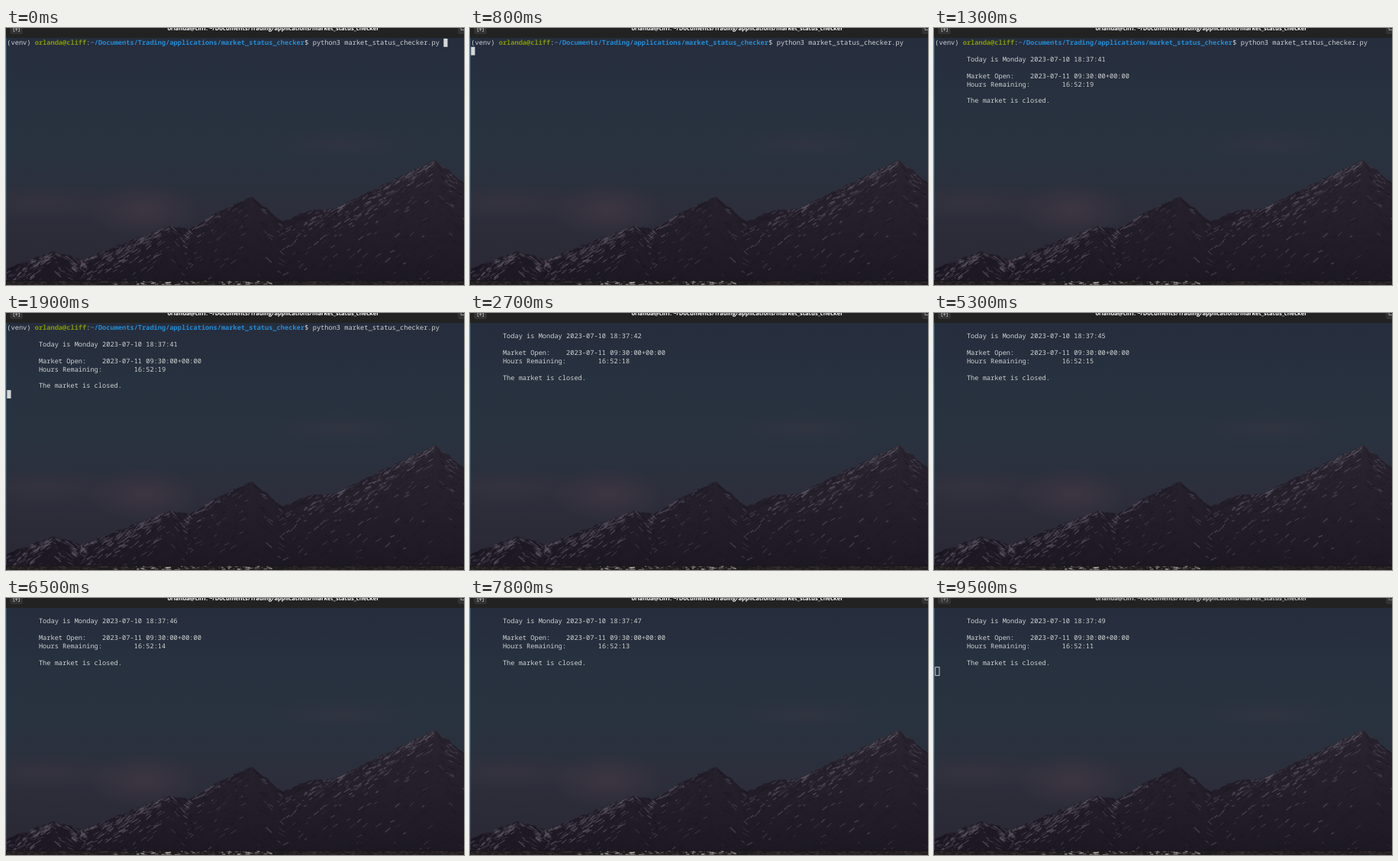
These frames come from a looping animation (600 by 337 pixels, 9600 ms). An HTML page with a canvas:

```html
<!DOCTYPE html>
<html lang="en">
<head>
<meta charset="utf-8">
<title>Market status checker</title>
<style>
  html, body { margin: 0; width: 100%; height: 100%; overflow: hidden; background: #222; }
  canvas, svg { position: absolute; left: 0; top: 0; width: 600px; height: 337px; }
  text { white-space: pre; text-rendering: geometricPrecision; }
  #screen text { font: 8.667px "Noto Sans Mono", "DejaVu Sans Mono", monospace; fill: #d0d2d2; }
  #screen .user { font-weight: 700; fill: #859900; }
  #screen .path { font-weight: 700; fill: #268bd2; }
  #title { font: 700 7.6px "Open Sans", "Noto Sans", sans-serif; fill: #fff; }
  .blurred #title { fill: #c4c4c4; }
  .blurred .icon { opacity: .6; }
</style>
</head>
<body>
<canvas id="wallpaper" width="600" height="337"></canvas>
<svg id="window" viewBox="0 0 600 337">
  <rect width="600" height="13" fill="#222"/>
  <rect x="5" y="-8" width="17" height="16" rx="3" fill="#333"/>
  <path class="icon" d="M11.5 0H10V4.5H11.5M16 0H17.5V4.5H16M12 1.5H15.5M13.7 0V4" fill="none" stroke="#bbb" stroke-width=".8"/>
  <rect x="592" y="-8" width="17" height="16" rx="3" fill="#333"/>
  <path class="icon" d="M596 0V2.5H600" fill="none" stroke="#bbb" stroke-width=".8"/>
  <text id="title" x="350" y="3.2" text-anchor="middle">orlanda@cliff: ~/Documents/Trading/applications/market_status_checker</text>
  <g id="screen"></g>
  <rect id="cursor" width="5.2" height="10.9"/>
</svg>
<script>
const LOOP = 9600, ENTER = 650, FIRST_OUTPUT = 1100, BLUR = 9400, BLINK = 600;
const CELL_W = 5.2, CELL_H = 10.9, LEFT = 1.3, TOP = 13.9;
const byId = id => document.getElementById(id);
const screenLayer = byId('screen'), cursor = byId('cursor'), frame = byId('window');

function addGroup() {
  const group = document.createElementNS('http://www.w3.org/2000/svg', 'g');
  return screenLayer.appendChild(group);
}

function write(group, row, col, content, className = '') {
  const node = document.createElementNS('http://www.w3.org/2000/svg', 'text');
  node.setAttribute('x', LEFT + col * CELL_W);
  node.setAttribute('y', TOP + row * CELL_H + 8.3);
  node.setAttribute('class', className);
  node.textContent = content;
  return group.appendChild(node);
}

const prompt = addGroup();
let column = 0;
for (const [content, style] of [
  ['(venv) '], ['orlanda@cliff', 'user'], [':'],
  ['~/Documents/Trading/applications/market_status_checker', 'path'],
  ['$ '], ['python3 '], ['market_status_checker.py ']
]) {
  write(prompt, 0, column, content, style);
  column += content.length;
}

const report = addGroup();
write(report, 1, 8, 'Today is Monday');
const today = write(report, 1, 24, '');
write(report, 3, 8, 'Market Open:');
write(report, 3, 24, '2023-07-11 09:30:00+00:00');
write(report, 4, 8, 'Hours Remaining:');
const remaining = write(report, 4, 32, '');
write(report, 6, 8, 'The market is closed.');

function placeCursor(row, col, hollow, visible) {
  const inset = hollow ? .5 : 0;
  cursor.setAttribute('x', LEFT + col * CELL_W + inset);
  cursor.setAttribute('y', TOP + row * CELL_H + inset);
  cursor.setAttribute('fill', hollow ? 'none' : '#d6d8d8');
  cursor.setAttribute('stroke', hollow ? '#c8caca' : 'none');
  cursor.setAttribute('visibility', visible ? 'visible' : 'hidden');
}

function render(now) {
  const t = now % LOOP;
  const tick = Math.floor((t - FIRST_OUTPUT) / 1000);
  const blurred = t >= BLUR;
  const lit = t < ENTER || (t - ENTER) % (2 * BLINK) < BLINK;

  frame.classList.toggle('blurred', blurred);
  prompt.style.display = tick < 1 ? '' : 'none';
  report.style.display = tick < 0 ? 'none' : '';
  report.setAttribute('transform', `translate(0 ${tick === 0 ? CELL_H : 0})`);
  today.textContent = `2023-07-10 18:37:${41 + tick}`;
  remaining.textContent = `16:52:${19 - tick}`;

  if (t < ENTER) placeCursor(0, column, false, true);
  else placeCursor(tick < 0 ? 1 : tick === 0 ? 8 : 7, 0, blurred, blurred || lit);
  requestAnimationFrame(render);
}

const ctx = byId('wallpaper').getContext('2d');
let seed = 17;
const random = () => (seed = seed * 16807 % 2147483647) / 2147483647;
const between = (a, b) => a + (b - a) * random();

function gradient(y0, y1, ...colors) {
  const fill = ctx.createLinearGradient(0, y0, 0, y1);
  colors.forEach((color, i) => fill.addColorStop(i / (colors.length - 1), color));
  return fill;
}

function cloud(x, y, rx, ry, alpha) {
  ctx.save();
  ctx.translate(x, y);
  ctx.scale(rx, ry);
  const glow = ctx.createRadialGradient(0, 0, 0, 0, 0, 1);
  glow.addColorStop(0, `rgba(72,58,70,${alpha})`);
  glow.addColorStop(1, 'rgba(72,58,70,0)');
  ctx.fillStyle = glow;
  ctx.fillRect(-1, -1, 2, 2);
  ctx.restore();
}

// Summits and saddles; snow is the cover of the slope leading up to each.
const summits = [
  { x: 0, y: 316, snow: 0 }, { x: 62, y: 293, snow: .5 },
  { x: 100, y: 304, snow: .3 }, { x: 215, y: 259, snow: .6 },
  { x: 240, y: 264, snow: .4 }, { x: 276, y: 242, snow: .5 },
  { x: 322, y: 221, snow: .15 }, { x: 362, y: 254, snow: .1 },
  { x: 398, y: 239, snow: .2 }, { x: 430, y: 237, snow: .5 },
  { x: 562, y: 173, snow: 1 }, { x: 600, y: 203, snow: .25 }
];

function slopeAt(x) {
  const i = Math.max(1, summits.findIndex(s => s.x >= x));
  const from = summits[i - 1], to = summits[i];
  const k = (x - from.x) / (to.x - from.x);
  const jag = Math.sin(x * .29) + .8 * Math.sin(x * .71 + 1);
  return {
    y: from.y + (to.y - from.y) * k + jag * Math.sin(k * Math.PI),
    side: to.y < from.y ? -1 : 1,
    snow: to.snow
  };
}

function streak(x, y, dx, dy, width, color) {
  ctx.strokeStyle = color;
  ctx.lineWidth = width;
  ctx.beginPath();
  ctx.moveTo(x, y);
  ctx.lineTo(x + dx, y + dy);
  ctx.stroke();
}

function paintMountains() {
  ctx.save();
  ctx.beginPath();
  ctx.moveTo(0, 331);
  for (let x = 0; x <= 600; x += 2) ctx.lineTo(x, slopeAt(x).y);
  ctx.lineTo(600, 331);
  ctx.fillStyle = gradient(173, 331, '#29242f', '#241f2b', '#1d1924');
  ctx.fill();
  ctx.clip();

  // Grain runs down each slope; snow gathers in patches near the crest.
  for (let i = 0; i < 3200; i++) {
    const x = between(0, 600);
    const { y: crest, side, snow } = slopeAt(x);
    const below = (331 - crest) * random() ** 1.5;
    const y = crest + below;
    const patch = .5 + .3 * Math.sin(x * .13 + y * .17) + .2 * Math.sin(x * .31 - y * .2);
    const cover = snow * Math.exp(-((below / 30) ** 2)) + .12;
    const length = between(2, 8);
    const color = random() < cover * patch * 1.3
      ? `rgba(104,97,112,${between(.25, .6)})`
      : `rgba(28,24,34,${between(.1, .4)})`;
    streak(x, y, side * length, length * between(.4, 1), between(.6, 1.6), color);
  }
  ctx.restore();
}

function paintDesktopStrip() {
  ctx.fillStyle = '#19181c';
  ctx.fillRect(0, 330.5, 600, 1.5);
  ctx.fillStyle = '#1e1b1e';
  ctx.fillRect(0, 332, 600, 5);
  for (let i = 0; i < 450; i++) {
    const x = between(0, 600);
    const sunlit = x > 140 && x < 350 && random() < .55 + .35 * Math.cos((x - 205) / 19);
    const color = sunlit ? '176,166,162' : '58,50,50';
    ctx.fillStyle = `rgba(${color},${between(.2, .7)})`;
    ctx.fillRect(x, between(331.5, 336), between(1, 6), between(1, 2));
  }
}

function paintWallpaper() {
  ctx.fillStyle = gradient(13, 320, '#262d3d', '#27313f', '#29323f', '#2d2e3b', '#2a2835');
  ctx.fillRect(0, 13, 600, 319);
  cloud(180, 238, 75, 36, .6);
  cloud(50, 228, 110, 24, .3);
  cloud(440, 152, 100, 20, .25);
  paintMountains();
  ctx.fillStyle = gradient(13, 331, '#315064', '#34566a', '#393b4b');
  ctx.fillRect(0, 13, 1, 318);
  paintDesktopStrip();
}

paintWallpaper();
requestAnimationFrame(render);
</script>
</body>
</html>
```
